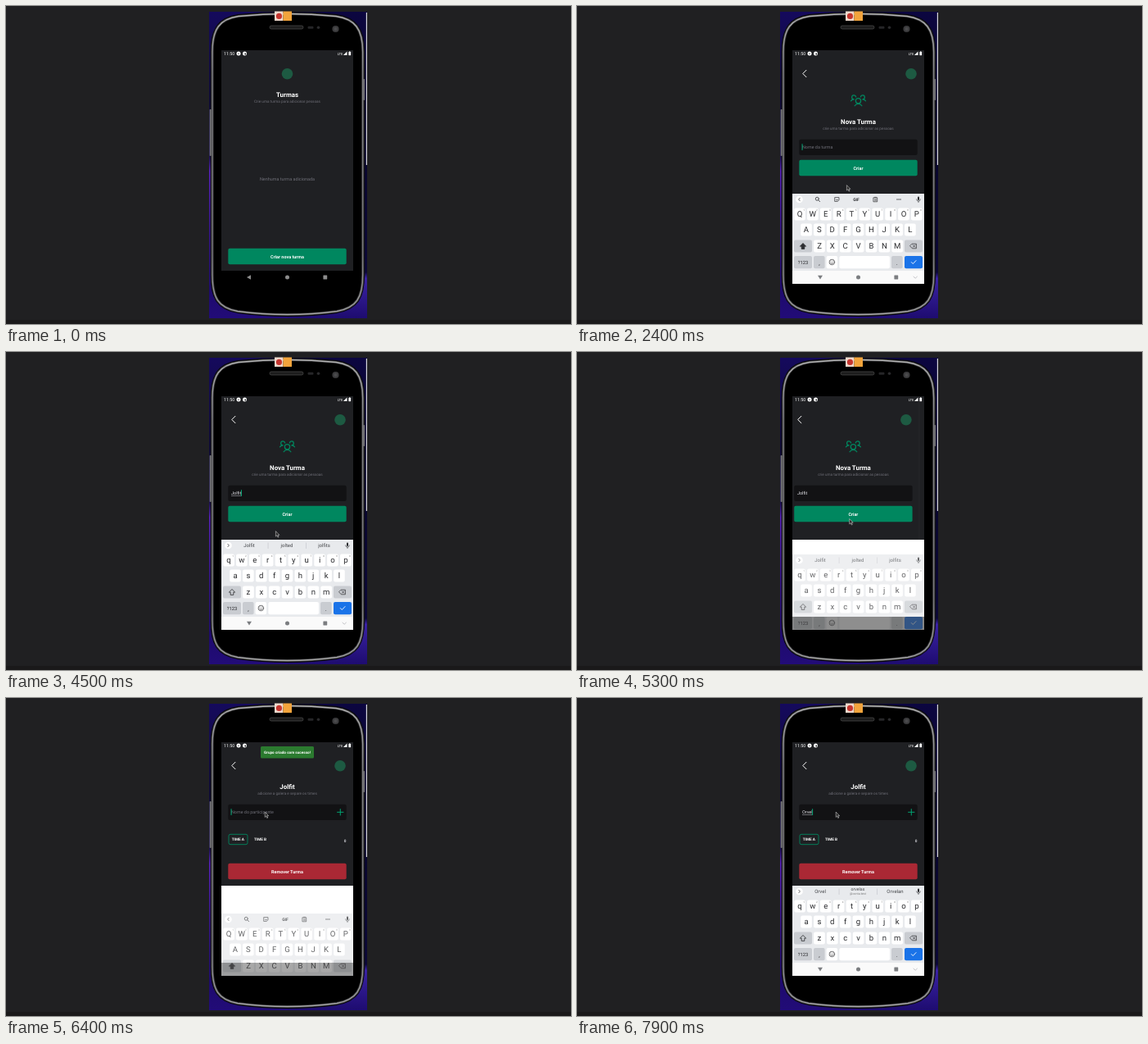
These frames come from a looping animation (690x388 px, 8 s). An HTML page:

```html
<!DOCTYPE html>
<html lang="pt">
<head>
<meta charset="utf-8">
<title>Turmas</title>
<style>
html, body { margin: 0; width: 100%; height: 100%; overflow: hidden; background: #202022; }
svg { display: block; width: 690px; height: 388px; }
text { font-family: Roboto, sans-serif; text-rendering: geometricPrecision; white-space: pre; }
</style>
</head>
<body>
<svg id="stage" viewBox="0 0 690 388" xmlns="http://www.w3.org/2000/svg"></svg>
<script>
const LOOP = 8000, STEP = 100, WIDTH = 160.5;
const GREEN = '#00875f', DARK = '#1f2023', GREY = '#6f6f78';
const GROUP = 'Jolfit', PERSON = 'Orvel';

// ---- markup helpers
const rect = (x, y, w, h, fill, r = 0, more = '') =>
  `<rect x="${x}" y="${y}" width="${w}" height="${h}" rx="${r}" fill="${fill}" ${more}/>`;
const disc = (x, y, r, fill) => `<circle cx="${x}" cy="${y}" r="${r}" fill="${fill}"/>`;
const line = (d, color, w = 1, more = '') =>
  `<path d="${d}" fill="none" stroke="${color}" stroke-width="${w}" stroke-linecap="round" stroke-linejoin="round" ${more}/>`;
const shape = (d, fill) => `<path d="${d}" fill="${fill}"/>`;
const label = (x, y, size, fill, str, { bold, anchor = 'middle', id = '' } = {}) =>
  `<text ${id && `id="${id}"`} x="${x}" y="${y}" font-size="${size}" fill="${fill}" text-anchor="${anchor}" font-weight="${bold ? 700 : 400}">${str}</text>`;
const group = (id, inner, more = '') => `<g id="${id}" ${more}>${inner}</g>`;
const button = (y, fill, str) =>
  rect(271.3, y - 0.2, 144.4, 19.4, fill, 2) + label(343.5, y + 11.8, 5.45, '#fff', str, { bold: true });
const title = (y, str, sub) =>
  label(343.5, y, 7.9, '#fff', str, { bold: true }) + label(343.5, y + 7.2, 4.65, GREY, sub);
const field = (id, y, hint) =>
  rect(271.3, y - 0.2, 144.4, 19.2, '#121214', 2) +
  label(275, y + 11.3, 5.4, GREY, hint, { anchor: 'start', id: id + 'Hint' }) +
  label(275, y + 11.3, 5.5, '#e1e1e6', '', { anchor: 'start', id: id + 'Text' }) +
  `<path id="${id}Under" stroke="#c4c4cc" stroke-width=".5"/>` +
  rect(274.6, y + 5.2, 0.9, 7.8, '#00b37e', 0, `id="${id}Caret"`);
const badge = x => disc(x, 82.8, 6.8, '#1d5a42');
const header = line('M280 78.3L275.8 82.5L280 86.7', '#fff', 1) + badge(408);
const edge = rect(263, 54, 1, 269, '#27272b');

// ---- phone
const body = 'M252 56C252 28 261 15.8 284 12.5Q343.5 6.5 403 12.5C426 15.8 435.7 28 435.7 56' +
  'L435.7 328C435.7 356 428 368 404 372.5Q343.5 380.5 283 372.5C259 368 252 356 252 328Z';
const phone =
  rect(0, 383, 690, 5, '#1a191a') +
  rect(248, 7, 96, 374, 'url(#wallLeft)') + rect(344, 7, 97, 374, 'url(#wallRight)') +
  rect(439.8, 8, 1.2, 186, '#d6d6dc') +
  `<path d="${body}" fill="#000" stroke="#060608" stroke-width="4.8"/>` +
  `<path d="${body}" fill="#000" stroke="#38383a" stroke-width="3.2"/>` +
  `<path d="${body}" fill="none" stroke="url(#metal)" stroke-width="1.4"/>` +
  rect(248.7, 126, 1.9, 57, '#77777a', 0.8) + rect(436.2, 89, 1.9, 26, '#727275', 0.8) +
  rect(322, 24, 41, 4, '#1c1c1c', 2, 'stroke="#464646" stroke-width=".8"') +
  rect(368.5, 24.8, 7, 3, '#252527', 1.2) + disc(381.5, 26.3, 1.8, '#2a2a2c') +
  disc(402.5, 28, 4.1, '#3a3a3c') + disc(402.5, 28, 2.2, '#4a4a4c') +
  rect(328, 6.5, 10.5, 11.5, '#f0d9cc') + disc(333.5, 12.4, 3.6, '#c5352f') +
  rect(338.5, 6.5, 10.5, 11.5, '#f2a43c');

const status =
  label(266, 60, 5.3, '#fff', '11:50', { anchor: 'start' }) +
  disc(284, 58, 2.5, '#fff') + disc(291.5, 58, 2.5, '#fff') + disc(292.3, 58.5, 1, DARK) + disc(284, 58.3, 0.7, DARK) +
  label(408, 59.8, 4.2, '#fff', 'LTE') + shape('M416.5 55.6V60H412Z', '#fff') +
  rect(418.4, 56, 2.7, 4.2, '#fff', 0.4) + rect(419.1, 55.3, 1.3, 1, '#fff');

const navIcons = (color, back) => shape(back, color) + disc(343.5, 331, 2.5, color) + rect(387.4, 328.6, 4.8, 4.8, color, 0.4);

// ---- app screens
const people = line('M72 216a65 65 0 0 1 112 0M60 116a60 60 0 0 0-48 24M196 116a60 60 0 0 1 48 24' +
  'M60 116a32 32 0 1 1 31.4-38M196 116a32 32 0 1 0-31.4-38M168 140a40 40 0 1 1-80 0a40 40 0 1 1 80 0',
  GREEN, 16, 'transform="translate(343.5 115.2) scale(.078) translate(-128 -132)"');

const home = rect(263, 54, 162, 269, DARK) + badge(343.5) +
  title(111, 'Turmas', 'Crie uma turma para adicionar pessoas') +
  label(343.5, 213, 5.45, GREY, 'Nenhuma turma adicionada') +
  button(296, GREEN, 'Criar nova turma');

const create = rect(263, 54, 162, 269, DARK) + group('createEdge', edge) + header +
  group('form', people + title(144, 'Nova Turma', 'crie uma turma para adicionar as pessoas') +
    field('team', 163, 'Nome da turma') + button(188, GREEN, 'Criar'));

const players = rect(263, 54, 162, 269, DARK) + group('playersEdge', edge) + header +
  title(111, GROUP, 'adicione a galera e separe os times') +
  field('name', 130, 'Nome do participante') +
  line('M404.6 139.3H412M408.3 135.6V143', '#00a472', 1) +
  rect(272, 166.3, 23, 12.4, 'none', 2, `stroke="${GREEN}" stroke-width=".9"`) +
  label(283.3, 174.3, 4.7, '#fff', 'TIME A', { bold: true }) +
  label(310.5, 174.3, 4.7, '#fff', 'TIME B', { bold: true }) +
  label(414, 176, 4.7, '#d0d0d6', '0', { bold: true }) +
  group('remove', button(202, '#aa2834', 'Remover Turma'));

const toast = rect(311, 59, 65, 14.5, '#2b7a2f', 1.5) +
  label(343.5, 68, 4.65, '#fff', 'Grupo criado com sucesso!', { bold: true });

// ---- keyboard
const INK = '#2b2c2f', PITCH = 15.87, KEY = '#c9ccd1';
const rows = [['QWERTYUIOP', 272, 254], ['ASDFGHJKL', 280, 273], ['ZXCVBNM', 296, 293]];
const letters = rows.map(([chars, x0, y], r) => [...chars].map((c, i) => {
  const x = x0 + i * PITCH;
  const hint = r ? '' : label(x + 5, y - 4, 3, '#777', (i + 1) % 10);
  return rect(x - 6.8, y - 7.6, 13.6, 15.2, '#fff', 2) + hint +
    `<text class="key" x="${x}" y="${y + 3.4}" font-size="9.6" fill="${INK}" text-anchor="middle">${c}</text>`;
}).join('')).join('');

const arrowUp = 'M276 289.4L279.6 293.2H277.8V296.4H274.2V293.2H272.4Z';
const special =
  rect(265, 285.4, 22, 15.2, KEY, 2) + `<path id="shift" d="${arrowUp}" stroke="${INK}" stroke-width=".8"/>` +
  rect(400, 285.4, 22, 15.2, KEY, 2) + line('M409.4 290.2H414.4V295.8H409.4L406.8 293ZM410.4 291.8L412.8 294.2M412.8 291.8L410.4 294.2', INK, 0.7) +
  rect(265, 305, 22, 15.2, KEY, 2) + label(276, 314.6, 5.8, INK, '?123') +
  rect(289, 305, 13.6, 15.2, KEY, 2) + label(296, 315.5, 7.5, INK, ',') +
  rect(304.6, 305, 13.6, 15.2, '#fff', 2) +
  line('M314.7 312.5a3.3 3.3 0 1 1-6.6 0a3.3 3.3 0 1 1 6.6 0M309.8 313.4Q311.4 315.4 313 313.4M310.2 311.3h.1M312.5 311.3h.1', INK, 0.7) +
  rect(320.4, 305, 61.6, 15.2, '#fff', 2) +
  rect(384, 305, 13.6, 15.2, KEY, 2) + label(390.8, 315.5, 7.5, INK, '.') +
  rect(400, 305, 22, 15.2, '#1a73e8', 2) + line('M408.4 312.6L410.3 314.5L414 310.6', '#fff', 0.9);

const tools = line('M272.2 234.2L270.6 236L272.2 237.8', INK, 0.7) +
  line('M295.3 235.3a2 2 0 1 1-4 0a2 2 0 1 1 4 0M294.8 236.9L296.6 238.7', INK, 0.8) +
  line('M315.1 233.6H320V236.7L318.4 238.4H315.1ZM316.3 236.3Q317.5 237.5 318.8 236.3', INK, 0.7) +
  label(341, 238, 5, INK, 'GIF', { bold: true }) +
  line('M362.3 233.8H366.7V238.8H362.3ZM363.6 233.4H365.4M363.6 235.8H365.4M363.6 237.2H365.4', INK, 0.7) +
  [-2, 0, 2].map(d => disc(393 + d, 236, 0.65, INK)).join('');
const suggest = line('M270.8 234.2L272.4 236L270.8 237.8', INK, 0.7) +
  rect(319.8, 232.5, 0.5, 7.5, '#b8bbc0') + rect(366, 232.5, 0.5, 7.5, '#b8bbc0') +
  [297, 343, 388.5].map((x, i) => label(x, 238.3, 6, '#45474b', '', { id: 'sug' + i })).join('') +
  label(343, 240.3, 3.7, '#777', '@conta.test', { id: 'mail' });
const mic = rect(416, 232.6, 2, 4.4, INK, 1) + line('M414.6 235.8Q414.8 238.2 417 238.2Q419.2 238.2 419.4 235.8M417 238.2V239.6', INK, 0.6);

const keyboard = rect(263, 229, 161.5, 110, '#fff') +
  group('keys', rect(263, 229, 161.5, 110, '#e8eaed') + disc(271.5, 236, 4.3, '#fff') +
    group('tools', tools) + group('suggest', suggest) + mic + letters + special) +
  rect(263, 323, 161.5, 16, '#000', 0, 'id="shade"') +
  group('lightNav', rect(263, 323, 161.5, 16, '#fafafa') + navIcons('#7b7d80', 'M294 328.8H300L297 333.6Z') +
    line('M411 330.2L413.2 332.2L415.4 330.2', '#b5b7ba', 0.8));

const clip = (id, y, h) => `<clipPath id="${id}"><rect x="263" y="${y}" width="161" height="${h}"/></clipPath>`;
const fade = (id, ...stops) => `<linearGradient id="${id}" x1="0" y1="0" x2="0" y2="1">` +
  stops.map(([at, color]) => `<stop offset="${at}" stop-color="${color}"/>`).join('') + '</linearGradient>';
const stage = document.getElementById('stage');
stage.innerHTML = '<defs>' + clip('screen', 54, 269) + clip('board', 229, 110) +
  fade('wallLeft', [0, '#150a5c'], [.3, '#0e0a38'], [.47, '#1a1050'], [.52, '#5a22c0'], [.7, '#3a1690'], [.9, '#1e0a6c'], [1, '#220c78']) +
  fade('wallRight', [0, '#0c0640'], [.3, '#08062a'], [.85, '#0c0838'], [.87, '#3a22a4'], [1, '#1e0c70']) +
  fade('metal', [0, '#b4b4b4'], [.2, '#7c7c7e'], [.8, '#747476'], [1, '#a6a6a6']) + '</defs>' +
  rect(0, 0, 690, 388, '#202022') + phone + navIcons('#8c8c8c', 'M299 328.2V333.8L294 331Z') +
  group('view', rect(263, 54, 161, 269, DARK) + group('home', home) + group('create', create) +
    group('players', players) + status + group('toast', toast), 'clip-path="url(#screen)"') +
  group('keyboard', keyboard, 'clip-path="url(#board)"') +
  group('cursor', '<path d="M0 0V6.4L1.5 5.1L2.6 7.5L3.6 7L2.5 4.7H4.5Z" fill="#262626" stroke="#d8d8d8" stroke-width=".55"/>');

// ---- motion
const el = {};
stage.querySelectorAll('[id]').forEach(n => { el[n.id] = n; });
const keys = [...stage.querySelectorAll('.key')];

function track(t, points) {
  if (t <= points[0][0]) return points[0].slice(1);
  for (let i = 1; i < points.length; i++) {
    const [a, ...from] = points[i - 1], [b, ...to] = points[i];
    if (t < b) return from.map((v, k) => v + (to[k] - v) * (t - a) / (b - a));
  }
  return points[points.length - 1].slice(1);
}
const within = (t, a, b) => t >= a && t < b;
const show = (node, on) => node.setAttribute('display', on ? 'inline' : 'none');
const move = (node, x, y) => node.setAttribute('transform', `translate(${x} ${y})`);
const typed = (t, word, times) => word.slice(0, times.filter(k => t >= k).length);

const pointer = [[100, 337, 307], [200, 381, 324], [300, 381, 324], [500, 424, 325], [600, 414, 319], [800, 357, 306],
  [900, 357, 306], [1000, 347, 306], [1200, 345, 250], [1400, 344.6, 199], [1600, 329.4, 218.6],
  [4600, 329.4, 218.6], [4900, 333, 200], [5300, 332.7, 203.5], [5600, 332.7, 203.5], [6100, 316.2, 139], [LOOP, 316.2, 139]];
const firstSlide = [[1100, 1], [1200, .95], [1300, .5], [1400, .146], [1500, .02], [1600, 0]];
const nextSlide = [[5200, 1], [5300, .962], [5400, .42], [5500, 0]];
const drop = [[1900, 62], [2000, 34], [2100, 12], [2200, 0], [5100, 0], [5200, 6], [5300, 18], [5400, 60], [5500, 94],
  [6200, 94], [6300, 64], [6400, 34], [6500, 14], [6600, 3], [6700, 0]];
const toastIn = [[5600, 0], [5900, 1], [7100, 1], [7400, 0]];

function setField(id, text, caret, live) {
  const box = el[id + 'Text'];
  box.textContent = text;
  show(el[id + 'Hint'], !text);
  const w = text ? box.getComputedTextLength() : 0;
  show(el[id + 'Caret'], caret);
  el[id + 'Caret'].setAttribute('x', 274.6 + w);
  const y = +box.getAttribute('y') + 1.2;
  el[id + 'Under'].setAttribute('d', text && live ? `M275 ${y}h${w}` : '');
}

function suggestions(word, first) {
  if (first) return [word, word.length < 4 ? 'jolt' : 'jolted', word.length < 4 ? 'jolly' : 'jolfits'];
  return [word, 'orvelas', 'Orvelan'];
}

function draw(t) {
  const [a] = track(t, firstSlide), [b] = track(t, nextSlide);
  move(el.home, (a - 1) * WIDTH, 0);
  move(el.create, (a + b - 1) * WIDTH, 0);
  move(el.players, b * WIDTH, 0);
  show(el.home, a > 0);
  show(el.create, a < 1 && b > 0);
  show(el.players, b < 1);
  show(el.createEdge, a > 0 && a < 1);
  show(el.playersEdge, b > 0 && b < 1);

  const open = within(t, 1900, 5500) || t >= 6300;
  const [shift] = track(t, drop);
  move(el.form, 0, t < 1900 ? 47 : 0);
  move(el.remove, 0, t < 6300 ? 94 : 0);

  const team = typed(t, GROUP, [2700, 3000, 3700, 4100, 4300, 4500]);
  const name = typed(t, PERSON, [7000, 7300, 7600, 7800, 7900]);
  const teamCaret = within(t, 2000, 2200) || within(t, 2400, 3400) || within(t, 3700, 5000);
  setField('team', team, teamCaret, t < 5000);
  setField('name', name, t >= 6300, true);

  show(el.keyboard, open);
  move(el.keys, 0, shift);
  el.keys.setAttribute('opacity', 1 - Math.min(0.28, shift * 0.02));
  el.shade.setAttribute('opacity', Math.min(0.9, shift && (t < 5600 ? 0.3 + shift * 0.008 : shift * 0.01)));
  show(el.lightNav, shift === 0);

  const first = t < 6000, word = first ? team : name;
  const lower = first ? t >= 2800 : t >= 7100;
  keys.forEach(k => {
    const c = k.textContent;
    k.textContent = lower ? c.toLowerCase() : c.toUpperCase();
  });
  el.shift.setAttribute('fill', lower ? 'none' : INK);
  show(el.tools, !lower);
  show(el.suggest, lower);
  suggestions(word, first).forEach((s, i) => { el['sug' + i].textContent = s; });
  show(el.mail, !first);
  el.sug1.setAttribute('font-size', first ? 6 : 5.2);
  el.sug1.setAttribute('y', first ? 238.3 : 234.8);

  const [up] = track(t, toastIn);
  el.toast.setAttribute('opacity', up);
  move(el.toast, 0, (up - 1) * 12);

  show(el.cursor, t >= 100);
  move(el.cursor, ...track(t, pointer));
}

const start = performance.now();
function tick() {
  const t = (performance.now() - start) % LOOP;
  draw(Math.floor(t / STEP) * STEP);
  requestAnimationFrame(tick);
}
draw(0);
requestAnimationFrame(tick);
</script>
</body>
</html>
```
